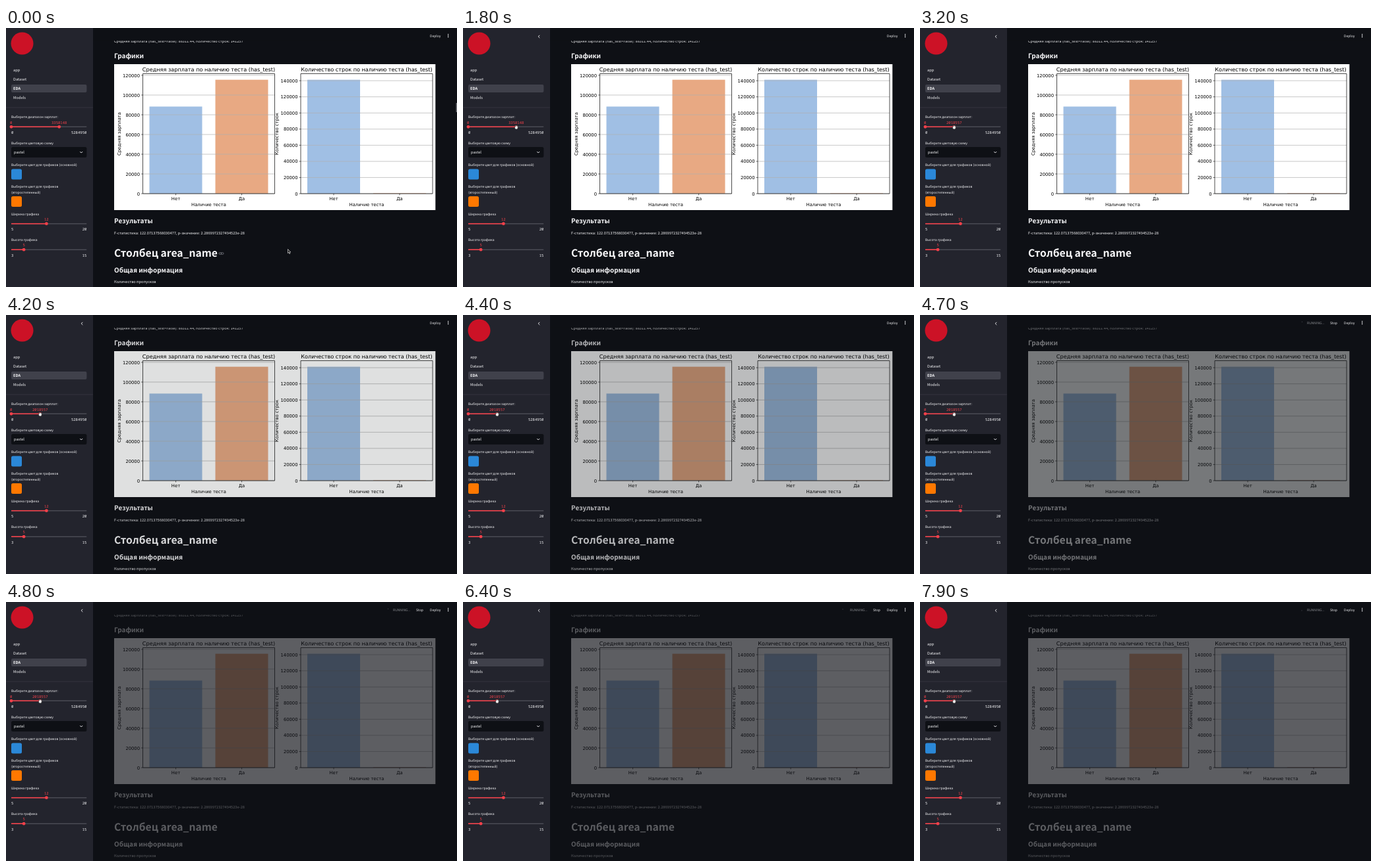
Write an HTML page that moves like this. It is 684x394 px and loops after 8 s.

```html
<!DOCTYPE html>
<html lang="ru">
<head>
<meta charset="utf-8">
<style>
  html, body { margin: 0; width: 100%; height: 100%; overflow: hidden; background: #0e1015; }
  svg { display: block; width: 684px; height: 394px; text-rendering: geometricPrecision; }
  text { white-space: pre; }
  .mono { font-family: "Noto Sans Mono", monospace; font-size: 5.6px; }
  .plot { font-family: "DejaVu Sans", sans-serif; font-size: 6.8px; fill: #000; }
</style>
</head>
<body>
<svg id="stage" viewBox="0 0 684 394"></svg>
<script>
const LOOP = 8000;
const RED = '#f3404a', WHITE = '#f7f7f9';
const BODY = 5.68, LABEL = 4.98, HEADING = 9.95, TITLE = 15.65;
const TRACK = { left: 8, width: 114.4 };
const SALARY_MAX = 5284950;

// Use the CJK face only when its Cyrillic is proportional.
const probe = document.createElement('canvas').getContext('2d');
probe.font = '100px "Noto Sans CJK JP", sans-serif';
const sans = probe.measureText('и').width < 80
  ? "'Noto Sans CJK JP', 'Open Sans', sans-serif"
  : "'Open Sans', 'Noto Sans', sans-serif";

const text = (x, y, string, size = LABEL, attrs = '') =>
  `<text x="${x}" y="${y}" font-size="${size}" ${attrs}>${string}</text>`;
const mono = (x, y, string, attrs = '') =>
  `<text class="mono" x="${x}" y="${y}" ${attrs}>${string}</text>`;
const plotText = (x, y, string, attrs = '') =>
  `<text class="plot" x="${x}" y="${y}" ${attrs}>${string}</text>`;
const rect = (x, y, w, h, fill, r = 0) =>
  `<rect x="${x}" y="${y}" width="${w}" height="${h}" rx="${r}" fill="${fill}"/>`;
const path = (d, stroke, width) =>
  `<path d="${d}" fill="none" stroke="${stroke}" stroke-width="${width}"/>`;
const MIDDLE = 'text-anchor="middle"', END = 'text-anchor="end"', BOLD = 'font-weight="700"';

function slider(y, min, max, value, id = '') {
  const { left, width } = TRACK;
  const x = left + (value - min) / (max - min) * width;
  return rect(left, y - .8, width, 1.6, '#4a4b54', .8) +
    `<rect id="${id}Fill" x="${left}" y="${y - .8}" width="${x - left}" height="1.6" fill="${RED}"/>` +
    `<circle id="${id}Thumb" cx="${x}" cy="${y}" r="2.4" fill="${RED}"/>` +
    mono(x, y - 4.8, value, `id="${id}Value" ${MIDDLE} fill="${RED}"`) +
    mono(left, y + 10.7, min) + mono(left + width, y + 10.7, max, END);
}

function axes({ left, step, unit, title, label, labelX, bars }) {
  const right = left + 200, bottom = 252, center = left + 100;
  let out = bars.map(([height, fill], i) =>
    rect(left + 10 + i * 100, bottom - height, 80, height, fill)).join('');
  for (let i = 0; i < unit; i++) {
    const y = bottom - i * step;
    out += path(`M${left} ${y}H${right}`, '#b0b0b0', .7) +
      path(`M${left - 2.4} ${y}H${left}`, '#000', .6) +
      plotText(left - 4.5, y + 2.5, i * 20000, END);
  }
  ['Нет', 'Да'].forEach((name, i) => {
    const x = left + 50 + i * 100;
    out += path(`M${x} ${bottom}v2.4`, '#000', .6) + plotText(x, 262, name, MIDDLE);
  });
  return out + path(`M${left} 69.5H${right}V${bottom}H${left}Z`, '#000', .7) +
    plotText(center, 271, 'Наличие теста', MIDDLE) +
    plotText(center, 66, title, `${MIDDLE} style="font-size:8.15px"`) +
    plotText(0, 0, label, `${MIDDLE} transform="translate(${labelX} 161) rotate(-90)"`);
}

const chart = rect(164, 55, 487.3, 222, '#fff') +
  axes({ left: 207.5, step: 30, unit: 7, labelX: 173.5, label: 'Средняя зарплата',
    title: 'Средняя зарплата по наличию теста (has_test)',
    bars: [[132.5, '#a0bfe4'], [173.3, '#e8a983']] }) +
  axes({ left: 447, step: 24.55, unit: 8, labelX: 413.3, label: 'Количество строк',
    title: 'Количество строк по наличию теста (has_test)',
    bars: [[173.3, '#a0bfe4'], [.7, '#e8a983']] });

const content =
  text(164, 22.3, 'Средняя зарплата (has_test=False): 88311.44, Количество строк: 141257', BODY) +
  text(164, 45.7, 'Графики', HEADING, BOLD) + chart +
  text(164, 297.4, 'Результаты', HEADING, BOLD) +
  text(164, 313.5, 'F-статистика: 122.07137568030477, p-значение: 2.2869972327494523e-28', BODY) +
  text(164, 347.6, 'Столбец area_name', TITLE, BOLD) +
  text(164, 372.2, 'Общая информация', HEADING, BOLD) +
  text(164, 388.4, 'Количество пропусков', BODY);

const sidebar = rect(0, 0, 132, 394, '#23242d') +
  '<circle cx="24.5" cy="23.5" r="17" fill="#cc1226"/>' +
  rect(8, 86, 114.4, 12, '#40414b', 2) +
  text(11, 65.5, 'app', BODY) + text(11, 79.7, 'Dataset', BODY) +
  text(11, 94.1, 'EDA', BODY, BOLD) + text(11, 108.4, 'Models', BODY) +
  path('M0 121H132', '#3b3c45', .7) +
  text(8, 137.2, 'Выберите диапазон зарплат:') +
  slider(150.3, 0, SALARY_MAX, 3358148, 'salary') +
  `<circle cx="8" cy="150.3" r="2.4" fill="${RED}"/>` +
  mono(6, 145.5, '0', `fill="${RED}"`) +
  text(8, 176.7, 'Выберите цветовую схему') +
  rect(8, 181, 114.4, 16, '#0e1015', 2.5) +
  text(12, 191.1, 'pastel', BODY) + path('M112.2 188l2 2 2-2', WHITE, .9) +
  text(8, 210, 'Выберите цвет для графиков (основной)') +
  rect(8, 214.5, 16, 16, '#2b88d8', 2.5) +
  text(8, 243, 'Выберите цвет для графиков') + text(8, 252.2, '(второстепенный)') +
  rect(8, 256, 16, 16, '#ff7800', 2.5) +
  text(8, 285, 'Ширина графика') + slider(297.7, 5, 20, 12, 'width') +
  text(8, 324.4, 'Высота графика') + slider(337.2, 3, 15, 5, 'height') +
  `<g id="collapse">${path('M116.3 10.9l-2.1 2.1 2.1 2.1', WHITE, .9)}</g>`;

const header = rect(132, 0, 552, 19.5, '#0e1015') +
  text(643, 13.8, 'Deploy') +
  [9.8, 11.8, 13.8].map(y => `<circle cx="670.6" cy="${y}" r=".75"/>`).join('') +
  `<g id="running">${text(587, 13.8, 'RUNNING...', LABEL, 'fill="#8b8c91"')}${text(622, 13.8, 'Stop')}
    <circle id="spark" r=".7" fill="#3a3c43"/></g>`;

const overlays =
  `<g id="link" fill="none" stroke="#777980" stroke-width=".8">
    <rect x="323" y="341.6" width="4" height="2.8" rx="1.4"/>
    <rect x="326" y="341.6" width="4" height="2.8" rx="1.4"/></g>` +
  `<g id="scrollbar">${rect(682.6, 114, 1.4, 14, '#77787d')}</g>` +
  `<path id="arrow" d="M0 0V6L1.4 4.8 2.4 7 3.4 6.5 2.4 4.4H4.2Z" fill="#111" stroke="#fff" stroke-width=".6"/>` +
  `<path id="hand" d="M-2.3 -.3L-1.6 -1.2V-2.2H-.7L0 -2.7 .8 -2.2H1.7L2.4 -1.3V.9L1.5 2.7H-1.1L-2.3 1Z"
    fill="#eee" stroke="#222" stroke-width=".6"/>`;

document.getElementById('stage').innerHTML =
  `<g fill="${WHITE}" font-family="${sans}"><g id="content">${content}</g>${header}${sidebar}${overlays}</g>`;

const el = id => document.getElementById(id);
const set = (id, attrs) => {
  for (const [name, value] of Object.entries(attrs)) el(id).setAttribute(name, value);
};
const show = (id, visible) => set(id, { visibility: visible ? 'visible' : 'hidden' });
const progress = (t, from, to) => Math.min(1, Math.max(0, (t - from) / (to - from)));
const smooth = p => p * p * (3 - 2 * p);
const mix = (a, b, p) => a + (b - a) * p;

const SPARKS = [[0, 579.5, 10.5], [5100, 580, 10], [5300, 574, 13.5], [5500, 579.5, 9.5],
  [5900, 580, 11], [6400, 576, 11], [6900, 577, 10], [7400, 577, 9], [7900, 579, 13]];

function render(t) {
  const approach = smooth(progress(t, 0, 900));
  const settle = progress(t, 900, 1300);
  const salary = Math.round(mix(3358148, 2018557, smooth(progress(t, 1800, 2600))));
  const thumbX = TRACK.left + salary / SALARY_MAX * TRACK.width;
  const cursorX = mix(427.5, 82, approach), cursorY = mix(336.5, 152, approach);

  set('salaryFill', { width: thumbX - TRACK.left });
  set('salaryThumb', { cx: thumbX });
  set('salaryValue', { x: thumbX });
  el('salaryValue').textContent = salary;

  set('arrow', { transform: `translate(${cursorX} ${cursorY})` });
  set('hand', { transform: `translate(${thumbX + mix(1.5, .1, settle)} ${mix(152.2, 151.2, settle)})` });
  show('arrow', t < 900);
  show('hand', t >= 900);
  show('link', t < 200);
  show('scrollbar', t < 500);
  show('collapse', cursorX < 132);

  set('content', { opacity: 1 - .67 * progress(t, 3900, 4800) ** 1.5 });
  show('running', t >= 4700);
  const [, cx, cy] = SPARKS.findLast(([start]) => start <= t);
  set('spark', { cx, cy });
}

function tick() {
  render(Math.floor(performance.now() % LOOP / 100) * 100);
  requestAnimationFrame(tick);
}
tick();
</script>
</body>
</html>
```
